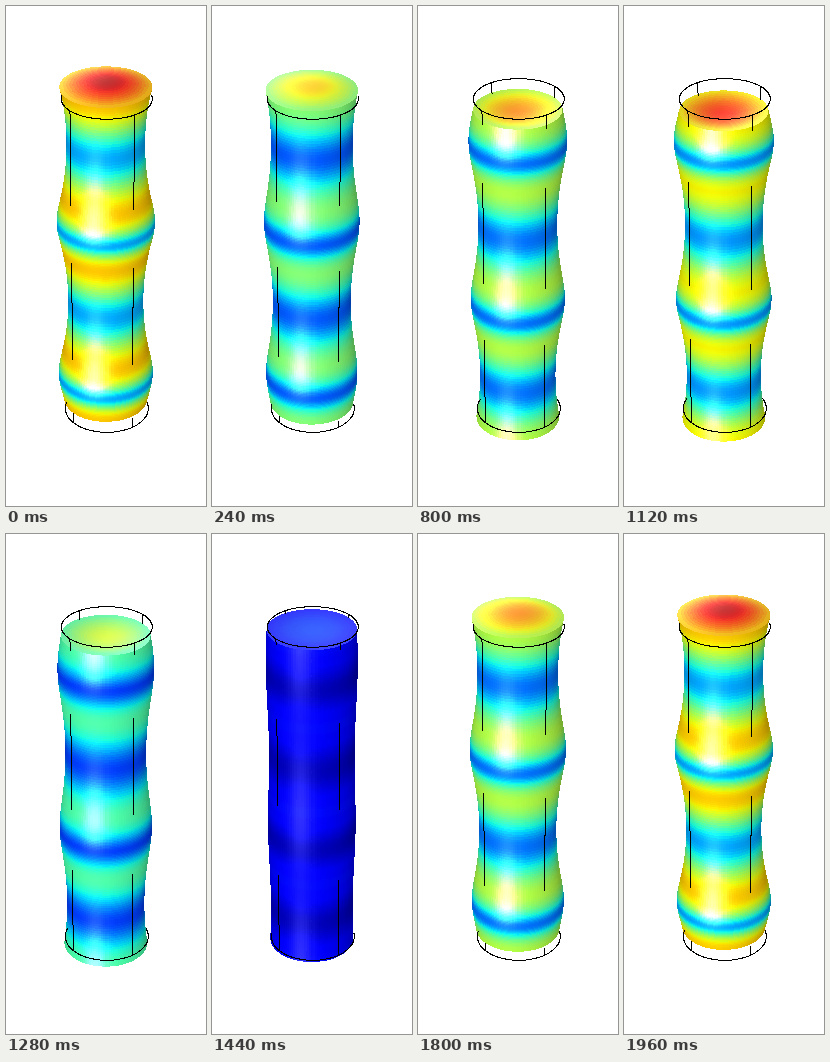
Recreate the animation shown at these times as a matplotlib script. Size 200 by 500 pixels, loop 2000 ms.

```python
import numpy as np
import matplotlib.pyplot as plt
from matplotlib.animation import FuncAnimation
from matplotlib.collections import PolyCollection

W, H, DPI = 200, 500, 100
FRAMES, INTERVAL = 50, 40

# Camera, in units of the rod radius
ELEV = np.radians(31)
DIST, FOCAL = 46, 1996
CX, CY = 99.8, 254.4
VIEW = np.array([0, np.cos(ELEV), np.sin(ELEV)])

LENGTH = 8.3
AXIAL, RADIAL, DOME = 0.30, 0.125, 0.11
U_MAX = 0.43
# Aliased fills spill about half a pixel past their outline
TRIM = np.array([0.987, 0.987, 0.997])

LAMP = np.array([-0.25, 0.93, 0.27])
STREAK = np.array([-0.234, 0.904, 0.358])
SHEEN = np.array([-0.3, -0.3, 0.905])
JET = plt.get_cmap("jet")

s = np.linspace(0, 1, 161)
phi = np.radians(np.linspace(-100, 100, 61))
rho = np.linspace(0, 1, 15)
turn = np.linspace(0, 2 * np.pi, 73)

# Mode shape: axial and radial motion along the rod, s runs downwards
uz = AXIAL * np.cos(4 * np.pi * s)
ur = -RADIAL * np.sin(4 * np.pi * s) + 0.02 * np.exp(-s / 0.03)


def project(p):
    depth = DIST - p @ VIEW
    up = p[..., 2] * VIEW[1] - p[..., 1] * VIEW[2]
    xy = np.stack([CX + FOCAL * p[..., 0] / depth, CY - FOCAL * up / depth], -1)
    return xy, depth


def profile(c):
    return LENGTH * (0.5 - s) + c * uz, 1 + c * ur


def cap(r, c):
    return LENGTH / 2 + c * (AXIAL + DOME * np.cos(np.pi / 2 * np.minimum(r, 1)))


def shade(value, normal):
    normal = normal / np.linalg.norm(normal, axis=-1, keepdims=True)

    def facing(light):
        return np.maximum(normal @ light, 0)

    diffuse = np.clip(0.68 + 0.35 * facing(LAMP), 0, 1)
    gloss = facing(STREAK) ** 30 + 0.5 * facing(SHEEN) ** 8
    rgb = JET(value)[..., :3] * diffuse[..., None] + gloss[..., None]
    return np.clip(rgb, 0, 1)


def quads(points, colors):
    def corners(a):
        return np.stack([a[:-1, :-1], a[:-1, 1:], a[1:, 1:], a[1:, :-1]], 2)

    xy, depth = project(points * TRIM)
    faces = corners(xy).reshape(-1, 4, 2)
    fill = corners(colors).mean(2).reshape(-1, 3)
    order = np.argsort(-corners(depth).mean(2).ravel(), kind="stable")
    return faces[order], fill[order]


def side(c):
    z, r = profile(c)
    slope = np.gradient(r, z)
    one = np.ones((len(s), len(phi)))
    x, y = np.sin(phi) * one, np.cos(phi) * one
    points = np.stack([r[:, None] * x, r[:, None] * y, z[:, None] * one], -1)
    normal = np.stack([x, y, -slope[:, None] * one], -1)
    value = abs(c) * np.hypot(uz, ur) / U_MAX
    return quads(points, shade(value[:, None] * one, normal))


def top(c):
    r = rho[:, None] * (1 + c * ur[0])
    z = cap(rho, c)
    slope = np.gradient(z, rho)
    one = np.ones((len(rho), len(turn)))
    x, y = np.sin(turn) * one, np.cos(turn) * one
    points = np.stack([r * x, r * y, z[:, None] * one], -1)
    normal = np.stack([-slope[:, None] * x, -slope[:, None] * y, one], -1)
    value = np.hypot(z - LENGTH / 2, c * ur[0] * rho) / U_MAX
    return quads(points, shade(value[:, None] * one, normal))


def wire_points():
    ring = np.linspace(0, 2 * np.pi, 400)
    zs = np.linspace(-LENGTH / 2, LENGTH / 2, 450)
    paths = [np.stack([np.sin(ring), np.cos(ring), 0 * ring + z], -1)
             for z in (-LENGTH / 2, LENGTH / 2)]
    for x, y in ((-0.8, 0.6), (0.6, 0.8), (-0.6, -0.8), (0.8, -0.6)):
        paths.append(np.stack([0 * zs + x, 0 * zs + y, zs], -1))
    return np.concatenate(paths)


points = wire_points()
wire_xy = np.floor(project(points)[0]) + 0.5
reach = 1e-4 + 2.6 * np.linspace(0, 1, 50) ** 3
rays = points[:, None] + reach[:, None] * VIEW
ray_r = np.hypot(rays[..., 0], rays[..., 1])
ray_z = rays[..., 2]


def visible_wire(c):
    """Keep the wire points whose line of sight misses the solid."""
    z, r = profile(c)
    radius = np.interp(ray_z, z[::-1], r[::-1])
    inside = (ray_r < radius) & (ray_z < cap(ray_r, c)) & (ray_z > z[-1])
    return wire_xy[~inside.any(1)]


fig = plt.figure(figsize=(W / DPI, H / DPI), dpi=DPI, facecolor="white")
ax = fig.add_axes([0, 0, 1, 1])
ax.set_xlim(0, W)
ax.set_ylim(H, 0)
ax.axis("off")

body = PolyCollection([], antialiaseds=False, linewidths=0)
ax.add_collection(body, autolim=False)
# Pixel markers keep the wire exactly one pixel wide
wire, = ax.plot([], [], ",", color="black", zorder=3)


def update(i):
    c = np.cos(2 * np.pi * i / FRAMES)
    side_faces, side_fill = side(c)
    top_faces, top_fill = top(c)
    body.set_verts(np.concatenate([side_faces, top_faces]))
    body.set_facecolor(np.concatenate([side_fill, top_fill]))
    # Small bias settles depth ties near the rest position
    wire.set_data(*visible_wire(c - 0.09).T)
    return body, wire


anim = FuncAnimation(fig, update, frames=FRAMES, interval=INTERVAL,
                     repeat=True, repeat_delay=0, blit=False)
plt.show()
```
